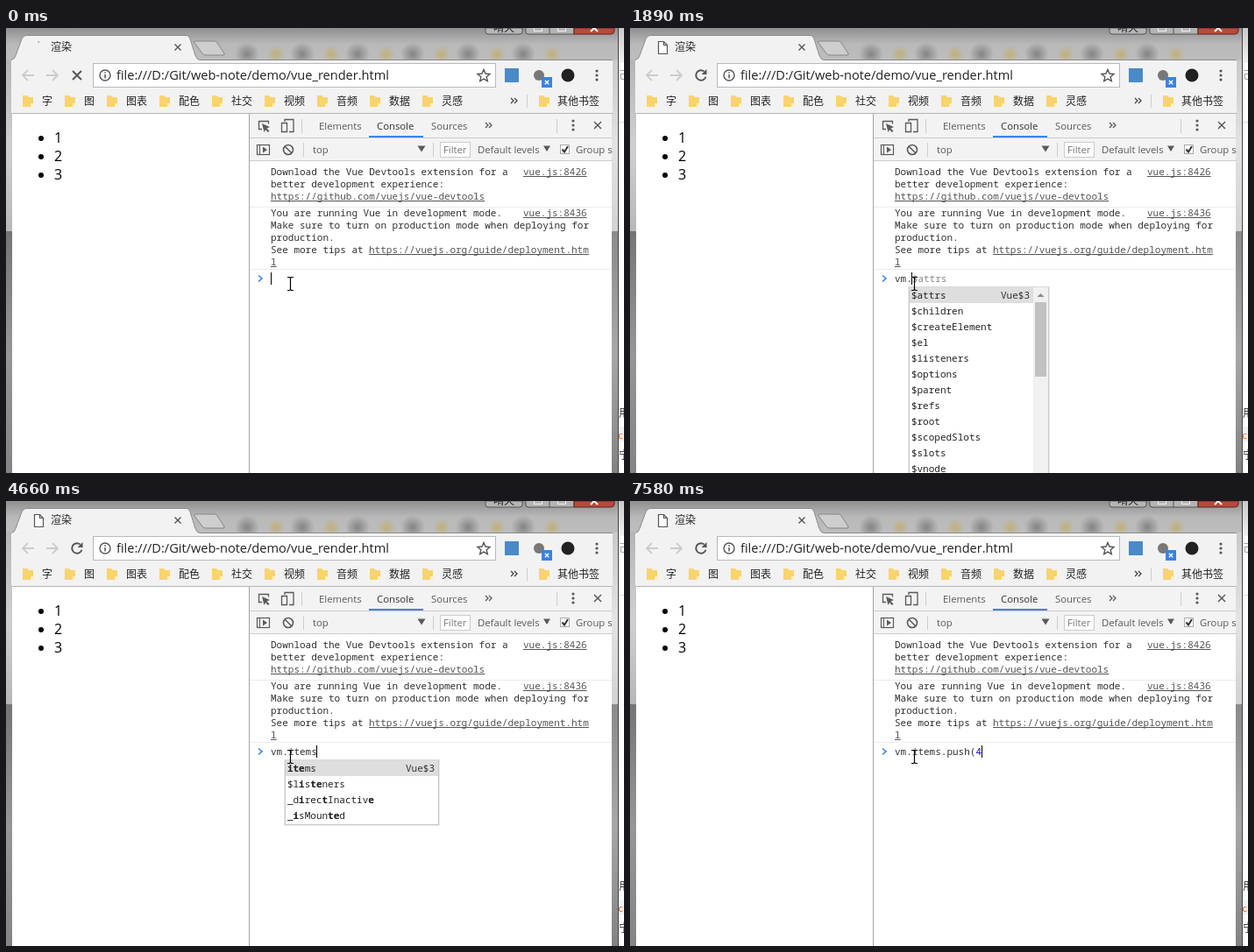
An HTML page with a canvas for the animation above (8000 ms loop, 705 px wide and 508 px high).

```html
<!DOCTYPE html>
<html lang="zh">
<head>
<meta charset="utf-8">
<title>Console demo</title>
<style>
html, body { margin: 0; width: 100%; height: 100%; overflow: hidden; background: #fff; }
canvas { display: block; }
</style>
</head>
<body>
<canvas id="stage" width="705" height="508"></canvas>
<script>
const stage = document.getElementById('stage');
const g = stage.getContext('2d', { alpha: false, willReadFrequently: true });
const LOOP = 8000, CHAR = 6.6, PROMPT_X = 302;
const UI = '11.3px "Open Sans", sans-serif';
const CJK = '12px "Noto Sans CJK SC", "Noto Sans CJK", sans-serif';
const MONO = '11px "Noto Sans Mono", monospace';
const BOLD = 'bold ' + MONO;

function rect(x, y, w, h, color) {
  g.fillStyle = color;
  g.fillRect(x, y, w, h);
}
function frame(x, y, w, h, color, lineWidth = 1) {
  g.strokeStyle = color;
  g.lineWidth = lineWidth;
  g.strokeRect(x, y, w, h);
}
function text(s, x, y, color, font, align = 'left') {
  g.font = font;
  g.textAlign = align;
  g.fillStyle = color;
  g.fillText(s, x, y);
}
function shape(d, fill, stroke, lineWidth = 1) {
  const p = new Path2D(d);
  if (fill) { g.fillStyle = fill; g.fill(p); }
  if (stroke) { g.strokeStyle = stroke; g.lineWidth = lineWidth; g.stroke(p); }
}
function arc(x, y, r, from, to, color, lineWidth) {
  g.beginPath();
  g.arc(x, y, r, from, to);
  g.strokeStyle = color;
  g.lineWidth = lineWidth;
  g.stroke();
}
function disc(x, y, r, color) {
  g.beginPath();
  g.arc(x, y, r, 0, 7);
  g.fillStyle = color;
  g.fill();
}
function cross(x, y, r, color, lineWidth) {
  shape(`M${x - r} ${y - r}l${2 * r} ${2 * r}m0 ${-2 * r}l${-2 * r} ${2 * r}`, null, color, lineWidth);
}
function dots(x, y, step, color) {
  for (const i of [-1, 0, 1]) disc(x, y + i * step, 1.6, color);
}
function gradient(x, y, w, h, ...stops) {
  const fill = g.createLinearGradient(0, y, 0, y + h);
  stops.forEach((c, i) => fill.addColorStop(i / (stops.length - 1), c));
  rect(x, y, w, h, fill);
}
function smudge(x, y, r, color) {
  const fill = g.createRadialGradient(x, y, 0, x, y, r);
  fill.addColorStop(0, color);
  fill.addColorStop(1, color + '00');
  rect(x - r, y - r, 2 * r, Math.min(2 * r, 36 - y + r), fill);
}
function chevrons(x, y, color) {
  shape(`M${x} ${y - 3}l3 3l-3 3m4 -6l3 3l-3 3`, null, color, 1.3);
}
function folder(x) {
  shape(`M${x - 6} 77h5l2 2h5v11h-12z`, '#f9d36b');
  rect(x + 3, 86, 3, 4, '#fff0b8');
}

function drawWindow() {
  rect(0, 0, 705, 508, '#fff');
  gradient(698, 0, 7, 40, '#c9c9c9', '#f2f2f2');
  rect(699, 107, 6, 1, '#ddd');
  rect(699, 455, 6, 17, '#f3f3f3');
  text('己', 699, 58, '#999', CJK);
  text('用', 699, 444, '#333', CJK);
  text('c', 698, 469, '#e8702a', MONO);
  text('宁', 699, 492, '#333', CJK);

  gradient(0, 0, 698, 37, '#8f8f8f', '#b9b9b9', '#bdbdbd');
  for (let x = 275; x < 640; x += 63) {
    smudge(x, 30, 14, '#848484');
    smudge(x + 33, 30, 10, '#c0b078');
  }
  gradient(0, 36, 7, 196, '#b5b5b5', '#cfcfcf', '#b7b7b7');
  gradient(691, 36, 8, 196, '#c9c9c9', '#e3e3e3', '#d2d2d2');
  gradient(0, 232, 7, 276, '#747474', '#969696', '#848484');
  gradient(691, 232, 8, 276, '#8b8b8b', '#a7a7a7', '#828282');
  rect(698, 0, 1, 508, '#444');

  shape('M547 0v4q0 3 3 3h36q3 0 3-3v-4z', '#b6b6b6', '#555');
  text('晴天', 556, 4, '#222', CJK);
  shape('M593 0v4q0 3 3 3h52v-7M620 0v7', '#b4b4b4', '#555');
  shape('M648 0v7h42q4 0 4-4v-3z', '#b84a3c', '#5b2420');
  frame(602.5, -2.5, 9, 6, '#eee');
  frame(629.5, -2.5, 9, 6, '#eee');
  cross(671, 0, 4, '#fff', 2);

  shape('M216 15h21q3 0 4 2l8 12q1 2-2 2h-19q-3 0-4-2l-9-12q-1-2 1-2z', '#cecece', '#858585');
  rect(6, 36, 686, 61, '#f2f2f2');
  const tab = 'M6 36.5q4-1 5-5l7-19q2-4 5-4h183q3 0 4 4l6 19q2 5 5 5';
  shape(tab, '#f2f2f2');
  shape(tab + 'H692', null, '#8b8b8b');
  text('渲染', 51, 26, '#222', CJK);
  cross(196, 22, 3.5, '#555', 1.4);
}

function drawToolbar() {
  shape('M32 54H19m6-6l-6 6l6 6M46 54h13m-6-6l6 6l-6 6', null, '#ccc', 1.8);
  rect(100, 41, 458, 26, '#fff');
  frame(99.5, 40.5, 459, 27, '#b9b9b9');
  arc(113, 54, 6, 0, 7, '#555', 1.4);
  rect(112.3, 53, 1.5, 4.5, '#555');
  rect(112.3, 50.3, 1.5, 1.5, '#555');
  text('file:///D:/Git/web-note/demo/vue_render.html', 126, 59, '#222', '14.55px "Open Sans", sans-serif');
  shape('M545 47.5l2 4.5 5 .5-3.8 3.3 1.1 4.8-4.3-2.5-4.3 2.5 1.1-4.8-3.8-3.3 5-.5z', null, '#555', 1.4);
  rect(569, 46, 16, 16, '#4a8ac8');
  disc(608, 54, 6, '#777');
  rect(611, 56, 12, 12, '#3b82e0');
  cross(617, 62, 2.2, '#fff', 1.3);
  disc(641, 54, 7.5, '#222');
  dots(674, 54, 5, '#555');

  let x = 25;
  for (const label of ['字', '图', '图表', '配色', '社交', '视频', '音频', '数据', '灵感']) {
    folder(x);
    text(label, x + 16, 88, '#222', CJK);
    x += label.length * 12 + 36;
  }
  chevrons(576, 83, '#444');
  rect(594, 76, 1, 15, '#ccc');
  folder(614);
  text('其他书签', 629, 88, '#222', CJK);
  rect(6, 97, 686, 1, '#b6b6b6');
}

function drawPage() {
  rect(7, 98, 270, 410, '#fff');
  for (let i = 0; i < 3; i++) {
    disc(40, 126 + i * 21, 3, '#000');
    text(i + 1, 55, 131 + i * 21, '#000', '16px "Open Sans", sans-serif');
  }
}

function link(s, x, y) {
  text(s, x, y, '#545454', MONO);
  rect(x, y + 1, s.length * CHAR, 1, '#545454');
}

function drawDevtools() {
  const ink = '#5a5a5a';
  rect(277, 98, 1, 410, '#a3a3a3');
  rect(278, 98, 413, 410, '#fff');
  rect(278, 98, 413, 54, '#f3f3f3');
  rect(278, 125, 413, 1, '#ccc');
  rect(278, 151, 413, 1, '#ccc');

  shape('M292 115.5h-3.5v-9h11v3', null, ink, 1.3);
  shape('M292 109l9 4-3.5 1.5 3 3-1.5 1.5-3-3-1.5 3z', ink);
  shape('M318 107v-2.5h10v14h-5M314.5 108.5h6v10h-6z', null, ink, 1.3);
  rect(337, 104, 1, 16, '#ccc');
  text('Elements', 357, 116, ink, UI);
  text('Console', 423, 116, '#333', UI);
  text('Sources', 485, 116, ink, UI);
  rect(414, 123, 62, 2, '#3f83ee');
  chevrons(547, 111, ink);
  rect(628, 104, 1, 16, '#ccc');
  dots(647, 111, 5, ink);
  cross(675, 111, 4, ink, 1.5);

  frame(286.5, 133.5, 14, 11, ink, 1.2);
  rect(289, 133, 1, 11, ink);
  shape('M293 135.5l5 3.5-5 3.5z', ink);
  arc(322, 139, 5.5, 0, 7, ink, 1.6);
  shape('M318 135l8 8', null, ink, 1.6);
  rect(339, 131, 1, 16, '#ccc');
  text('top', 350, 143, ink, UI);
  shape('M469.5 134.5h9l-4.5 7z', ink);
  rect(487, 131, 1, 16, '#ccc');
  rect(495, 130, 35, 18, '#fff');
  frame(495.5, 130.5, 34, 17, '#ccc');
  text('Filter', 499, 143, '#777', UI);
  text('Default levels', 538, 143, ink, UI);
  shape('M613 134.5h8l-4 6.5z', ink);
  rect(632, 133, 11, 11, '#fff');
  frame(632.5, 133.5, 10, 10, '#aaa');
  shape('M634.5 138.5l2.5 3 4-6.5', null, '#333', 2);
  text('Group s', 650, 143, ink, UI);

  const say = (s, y) => text(s, PROMPT_X, y, '#303030', MONO);
  say('Download the Vue Devtools extension for a', 168);
  say('better development experience:', 182);
  link('https://github.com/vuejs/vue-devtools', PROMPT_X, 196);
  link('vue.js:8426', 590, 168);
  rect(278, 204, 413, 1, '#ececec');
  say('You are running Vue in development mode.', 215);
  link('vue.js:8436', 590, 215);
  say('Make sure to turn on production mode when deploying for', 229);
  say('production.', 243);
  say('See more tips at', 257);
  link('https://vuejs.org/guide/deployment.htm', 414, 257);
  link('l', PROMPT_X, 271);
  rect(278, 275, 413, 1, '#ececec');
  shape('M288 282.5l4 3.5-4 3.5', null, '#3b82e8', 1.6);
}

// Suggestion lists: start column, right edge, query, detail, rows, scroll thumb end
const list = (column, right, query, detail, rows, thumb) =>
  ({ column, right, query, detail, rows: rows.split(' '), thumb });
const globals = list(0, 602, 'v', 'Window', 'visualViewport vm ValidityState VisualViewport VTTCue Vue AnimationEvent ApplicationCacheErrorEvent AudioProcessingEvent BeforeInstallPromptEvent BeforeUnloadEvent BlobEvent', 338);
const members = list(3, 477, '', 'Vue$3', '$attrs $children $createElement $el $listeners $options $parent $refs $root $scopedSlots $slots $vnode', 398);
const typo = list(3, 493, 'eit', 'Vue$3', '_isBeingDestroyed');
const iMembers = list(3, 600, 'i', 'Vue$3', 'items $children $listeners $options _directInactive _inactive _isBeingDestroyed _isDestroyed _isMounted _isVue _staticTrees _uid', 508);
const iteMembers = list(3, 493, 'ite', 'Vue$3', 'items $listeners _directInactive _isMounted');
const arrayAll = list(9, 516, '', 'Array', 'length __ob__ pop push reverse shift sort splice unshift concat constructor copyWithin', 441);
const arrayP = list(9, 600, 'p', 'Array', 'pop push splice copyWithin map propertyIsEnumerable');
const arrayPu = list(9, 460, 'pu', 'Array', 'push pop splice');

// Time, typed text, greyed completion, suggestion list, caret hidden
const steps = [
  [0, ''], [950, '', '', null, true], [1310, 'v'], [1490, 'vm', '', globals],
  [1790, 'vm.'], [1890, 'vm.', '$attrs', members], [2340, 'vm.', '$attrs', members, true],
  [2800, 'vm.e', '', members], [2980, 'vm.ei'], [3060, 'vm.eit', '', typo],
  [3260, 'vm.e', '', typo], [3340, 'vm.'], [3440, 'vm.i'], [3540, 'vm.it'],
  [3730, 'vm.ite', 'ms', iMembers], [3810, 'vm.ite', 'ms', iteMembers],
  [4280, 'vm.item', 's', iteMembers], [4660, 'vm.items', '', iteMembers],
  [5240, 'vm.items.'], [5410, 'vm.items.', 'length', arrayAll],
  [5510, 'vm.items.p', '', arrayAll], [5600, 'vm.items.p', 'op', arrayP],
  [5700, 'vm.items.pu', '', arrayP], [5790, 'vm.items.pu', 'sh', arrayPu],
  [5970, 'vm.items.pus', 'h', arrayPu], [6050, 'vm.items.push', '', arrayPu],
  [6280, 'vm.items.push('], [6820, 'vm.items.push(', '', null, true],
  [7280, 'vm.items.push('], [7580, 'vm.items.push(4']
];

function drawRow(name, query, x, y) {
  let matched = 0;
  text(name, x, y, '#222', MONO);
  for (let i = 0; i < name.length && matched < query.length; i++) {
    if (name[i].toLowerCase() !== query[matched]) continue;
    matched++;
    text(name[i], x + i * CHAR, y, '#222', BOLD);
  }
}

function drawList({ column, right, query, detail, rows, thumb }) {
  const start = PROMPT_X + column * CHAR, left = Math.floor(start - 2.6);
  const width = right - left, height = rows.length * 18 + 1;
  for (let i = 2; i >= 0; i--) {
    rect(left - i, 296 - i / 2, width + 2 * i, height + 1.5 * i, `rgba(0,0,0,${0.22 - i * 0.07})`);
  }
  rect(left, 296, width, height, '#fff');
  rect(left, 296, width, 18, '#dedede');
  rows.forEach((name, i) => drawRow(name, query, start - 0.9, 309 + i * 18));
  text(detail, right - (thumb ? 21 : 4), 309, '#333', MONO, 'right');
  if (thumb) {
    rect(right - 17, 296, 17, height, '#f1f1f1');
    shape(`M${right - 12.5} 307l4-4 4 4z`, '#8a8a8a');
    rect(right - 15, 313, 13, thumb - 313, '#c1c1c1');
  }
}

function drawPrompt([, typed, ghost = '', popup, hidden]) {
  const code = typed.replace(/\d/, ''), end = PROMPT_X + typed.length * CHAR;
  text(code, PROMPT_X, 290, '#303030', MONO);
  text(typed.slice(code.length), PROMPT_X + code.length * CHAR, 290, '#1c00cf', MONO);
  text(ghost, end, 290, '#888', MONO);
  if (!hidden) rect(Math.floor(end), 279, 1, 14, '#000');
  if (popup) drawList(popup);
  shape('M321 284.5h2.5l1 1 1-1h2.5M324.5 285v14M321 299.5h2.5l1-1 1 1h2.5', null, '#000', 1.2);
}

function drawLoading(phase) {
  if (phase < 9) {
    const head = -Math.PI / 2 - phase * 0.45;
    arc(37.5, 22.5, 6.5, head - 0.15 - phase * 0.12, head + 0.1, '#999', 1.6);
    cross(81, 54, 5, '#555', 1.9);
  } else {
    shape('M32.5 15.5h6l4 4v10h-10zM38.5 15.5v4h4', '#fff', '#555', 1.2);
    arc(81, 54, 5.7, 0.3, 5.4, '#555', 1.9);
    shape('M87.5 47v6h-6z', '#555');
  }
}

drawWindow();
drawToolbar();
drawPage();
drawDevtools();
const scene = document.createElement('canvas');
scene.width = stage.width;
scene.height = stage.height;
scene.getContext('2d', { alpha: false, willReadFrequently: true }).drawImage(stage, 0, 0);

let shown = '';
function render() {
  const t = performance.now() % LOOP;
  const phase = t < 120 ? 0 : Math.min(9, Math.floor((t - 120) / 91.25) + 1);
  const step = steps.filter(s => s[0] <= t).pop();
  const state = phase + ':' + step[0];
  if (state !== shown) {
    shown = state;
    g.drawImage(scene, 0, 0);
    drawLoading(phase);
    drawPrompt(step);
  }
  requestAnimationFrame(render);
}
render();
</script>
</body>
</html>
```
